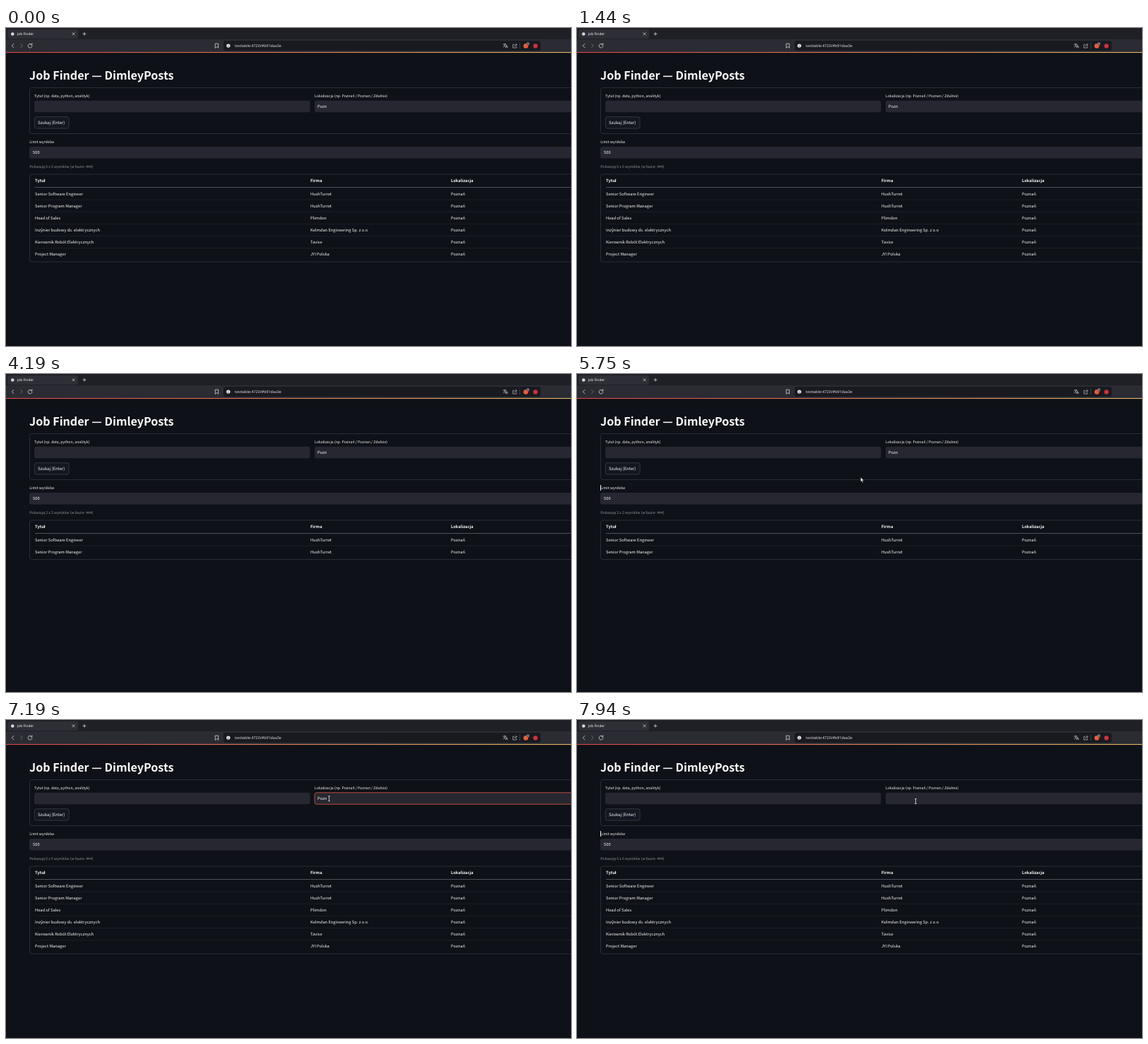
Recreate the animation shown at these times as an HTML page. Size 800 by 450 pixels, loop 8000 ms.

```html
<!DOCTYPE html>
<html lang="pl">
<head>
<meta charset="utf-8">
<title>Job Finder</title>
<style>
html, body { margin: 0; width: 100%; height: 100%; overflow: hidden; background: #0e1117; }
svg { display: block; width: 100vw; height: 100vh; }
text {
  font-family: "Noto Sans CJK JP", "Noto Sans CJK SC", "Noto Sans CJK KR", "Noto Sans", sans-serif;
  font-size: 5.75px; fill: #fafafa; white-space: pre; text-rendering: geometricPrecision;
}
.ui { font-family: "Noto Sans", "Open Sans", sans-serif; }
.label { font-size: 5.2px; }
.bold { font-weight: 700; }
.icon { fill: none; stroke: #d5d6da; stroke-width: .8; stroke-linecap: round; stroke-linejoin: round; }
.field { fill: #262730; }
.frame { fill: none; stroke: #2b2d37; }
.pointer { fill: #fff; stroke: #000; stroke-width: .5; stroke-linejoin: round; }
</style>
</head>
<body>
<svg viewBox="0 0 800 450" preserveAspectRatio="none">
  <defs>
    <linearGradient id="glow">
      <stop stop-color="#d9474a"/><stop offset="1" stop-color="#e6b866"/>
    </linearGradient>
  </defs>
  <rect width="800" height="450" fill="#0e1117"/>

  <!-- Browser bar -->
  <rect width="800" height="17" fill="#1f2026"/>
  <rect y="16" width="800" height="18.5" fill="#2b2c33"/>
  <rect x="2" y="2" width="100" height="13" rx="3" fill="#2e2f36"/>
  <rect x="308" y="18" width="449" height="14" rx="3" fill="#191a20"/>
  <rect y="34" width="800" height="1.1" fill="url(#glow)"/>
  <circle cx="9.3" cy="8.5" r="2.3" fill="#d8d9dc"/>
  <text class="ui" x="16" y="10.2" style="font-size:4.9px">Job Finder</text>
  <text class="ui" x="324" y="27" style="font-size:5.35px;fill:#dcdde1">testtable:4720/#b91daa3e</text>
  <g class="icon">
    <path d="M94 6.7l3.2 3.2m0-3.2l-3.2 3.2M109 8.3h4m-2-2v4"/>
    <path d="M11 22.4L8.3 25.1 11 27.8"/>
    <path d="M20.6 22.4l2.7 2.7-2.7 2.7" stroke="#74767d"/>
    <path d="M36.4 23.4A2.9 2.9 0 1 0 37 25.4M36.9 21.8v2h-2"/>
    <path d="M296.6 22.2h4v6l-2-1.7-2 1.7z"/>
    <path d="M704 23h4m-2-1v1m1.4 0c-.5 2-1.5 3-3.2 3.8m.8-2.6c.5 1 1.2 1.7 2 2.2m.4 1.5l1.4-3.6 1.4 3.6m-2.3-1.2h1.9" stroke-width=".6"/>
    <path d="M719.5 23.3h-1.8v4.8h5v-2M720 26c.2-1.6 1-2.4 3-2.4m-1.2-1.5l1.5 1.5-1.5 1.5" stroke-width=".6"/>
    <path d="M727.5 21v8" stroke="#50525a" stroke-width=".6"/>
  </g>
  <circle cx="314.8" cy="25.1" r="2.7" fill="#e4e5e8"/>
  <path d="M314.8 24.8v1.8m0-3v.3" stroke="#191a20" stroke-width=".7"/>
  <circle cx="736" cy="25.4" r="3.3" fill="#ee5a35"/>
  <rect x="737" y="20.2" width="4" height="4.2" rx="1" fill="#686b75"/>
  <circle cx="749.6" cy="25.4" r="3.1" fill="#d4303c"/>

  <!-- Page -->
  <text class="bold" x="33" y="72.5" style="font-size:16.1px">Job Finder — DimleyPosts</text>
  <rect class="frame" x="33.5" y="84.5" width="800" height="65" rx="3"/>
  <text class="label" x="40" y="98.1">Tytuł (np. data, python, analityk)</text>
  <text class="label" x="437" y="98.1">Lokalizacja (np. Poznań / Poznan / Zdalnie)</text>
  <rect class="field" x="40" y="102.7" width="390.5" height="16.6" rx="3"/>
  <rect class="field" id="place" x="437" y="102.8" width="400" height="16.4" rx="3"/>
  <rect id="mark" y="106.3" height="9.6" fill="#2469c8"/>
  <text id="typed" x="441" y="113.2">Pozn</text>
  <rect id="button" x="40.3" y="125.7" width="48.8" height="16.4" rx="3" stroke-width=".8"/>
  <text id="search" x="45" y="136.2" style="font-size:5.95px">Szukaj (Enter)</text>
  <text class="label" x="33.2" y="163.1">Limit wyników</text>
  <path id="caret" d="M33.5 157v8" stroke="#fff" stroke-width=".9"/>
  <rect class="field" x="33" y="168" width="820" height="16.5" rx="3"/>
  <text x="38" y="178.2">500</text>
  <text class="label" id="count" x="33.2" y="197.6" style="fill:#8f9197"></text>

  <!-- Results -->
  <rect class="frame" id="table" x="33.5" y="207" width="800" rx="3"/>
  <path d="M41 225.5H800" stroke="#555861" stroke-width=".9"/>
  <g id="rows"></g>

  <g id="pointer">
    <path class="pointer" id="arrow" d="M0 0V6.6L1.5 5.2 2.6 7.7 3.8 7.2 2.7 4.8H4.8Z"/>
    <path class="pointer" id="hand" d="M-.9.8a.9.9 0 0 1 1.8 0V3.3l2.6.6q1 .3 .9 1.3L4 8q-.2 1.2-1.2 1.2H.1Q-.6 9.2-1.1 8.4L-2.7 5.8q-.4-.9.4-1.1.6-.1 1.4.9Z"/>
    <path id="beam" d="M-1.5-3.5H-.4L0-3.2.4-3.5H1.5M0-3.2V3.2M-1.5 3.5H-.4L0 3.2.4 3.5H1.5" fill="none" stroke="#e8e8ea" stroke-width=".8"/>
  </g>
</svg>
<script>
const LOOP = 8000, STEP = 62.5, PITCH = 17.1;
const COLUMNS = [41, 431, 630];
const JOBS = [
  ["Senior Software Engineer", "HushTurret"],
  ["Senior Program Manager", "HushTurret"],
  ["Head of Sales", "Plimdon"],
  ["Inżynier budowy ds. elektrycznych", "Kelmdan Engineering Sp. z o.o"],
  ["Kierownik Robót Elektrycznych", "Tavise"],
  ["Project Manager", "JYI Polska"]
];
// Pointer paths: [tick, x, y]
const LEAVE = [[1, 480, 112], [4, 545, 100], [8, 680, 58], [12, 779, 23]];
const RETURN = [
  [81, 767, 114], [86, 604, 127], [91, 416, 146], [92, 401.5, 146], [94, 362, 138],
  [97, 225, 98], [101, 82, 128], [103, 70.5, 134.5], [105, 70.3, 135.3], [107, 82, 135],
  [110, 272, 122], [114, 463, 111], [116, 452, 111.5], [118, 412, 121], [120, 345.5, 133],
  [122, 362, 131], [125, 448, 118], [127, 479.5, 115]
];

const $ = id => document.getElementById(id);
const show = (id, on) => $(id).setAttribute("visibility", on ? "visible" : "hidden");
const set = (id, attrs) => {
  for (const key in attrs) $(id).setAttribute(key, attrs[key]);
};
const between = (v, a, b) => v >= a && v < b;

function add(parent, tag, attrs, content = "") {
  const el = document.createElementNS("http://www.w3.org/2000/svg", tag);
  for (const key in attrs) el.setAttribute(key, attrs[key]);
  el.textContent = content;
  return parent.appendChild(el);
}

function addCells(parent, cells, y, cls) {
  cells.forEach((cell, i) => add(parent, "text", { x: COLUMNS[i], y, class: cls }, cell));
}

addCells($("rows").parentNode.insertBefore(add($("rows"), "g", {}), $("rows")),
  ["Tytuł", "Firma", "Lokalizacja"], 218.3, "bold");

const rows = JOBS.map((job, i) => {
  const row = add($("rows"), "g", {});
  const y = 236.7 + PITCH * i;
  if (i) add(row, "path", { d: `M41 ${y - 10.7}H800`, stroke: "#20232b", "stroke-width": .8 });
  addCells(row, [...job, "Poznań"], y, "");
  return row;
});

function pointAt(path, n) {
  const last = path.length - 1;
  if (n < path[0][0] || n > path[last][0]) return null;
  const i = Math.max(1, path.findIndex(p => p[0] >= n));
  const [n0, x0, y0] = path[i - 1], [n1, x1, y1] = path[i];
  const k = (n - n0) / (n1 - n0);
  return [x0 + (x1 - x0) * k, y0 + (y1 - y0) * k];
}

function drawPointer(n) {
  const at = pointAt(LEAVE, n) || pointAt(RETURN, n);
  const [x, y] = at || [-20, -20];
  const onButton = between(x, 40, 89) && between(y, 125.5, 142);
  const onField = between(y, 103, 119) && (between(x, 40, 430) || x >= 437) ||
    between(y, 168, 184) && x >= 33;
  set("pointer", { transform: `translate(${x} ${y})` });
  show("hand", at && onButton);
  show("beam", at && onField);
  show("arrow", at && !onButton && !onField);
  set("button", { fill: "#131720", stroke: onButton ? "#f04a45" : "#3d404a" });
  $("search").style.fill = onButton ? "#f04a45" : "#fafafa";
  return x;
}

function drawResults(total) {
  $("count").textContent = `Pokazuję ${total} z ${total} wyników (w bazie: 444)`;
  rows.forEach((row, i) => row.setAttribute("visibility", i < total ? "visible" : "hidden"));
  set("table", { height: 21.3 + PITCH * total });
}

function draw(ms) {
  const n = Math.floor((ms + 3) / STEP);
  const x = drawPointer(n);
  drawResults(between(n, 30, 67) ? 4 : between(n, 67, 104) ? 2 : 6);

  const selecting = between(n, 115, 122);
  const start = Math.min(454.5, Math.max(440.8, n > 118 ? 0 : x));
  set("mark", { x: start, width: 454.5 - start });
  show("mark", selecting);
  show("typed", n < 122);
  set("place", { stroke: between(n, 114, 124) ? "#c94f42" : "none", "stroke-width": .9 });
  show("caret", between(n, 87, 95) || n >= 124);
}

function tick(now) {
  draw(now % LOOP);
  requestAnimationFrame(tick);
}
draw(0);
requestAnimationFrame(tick);
</script>
</body>
</html>
```
